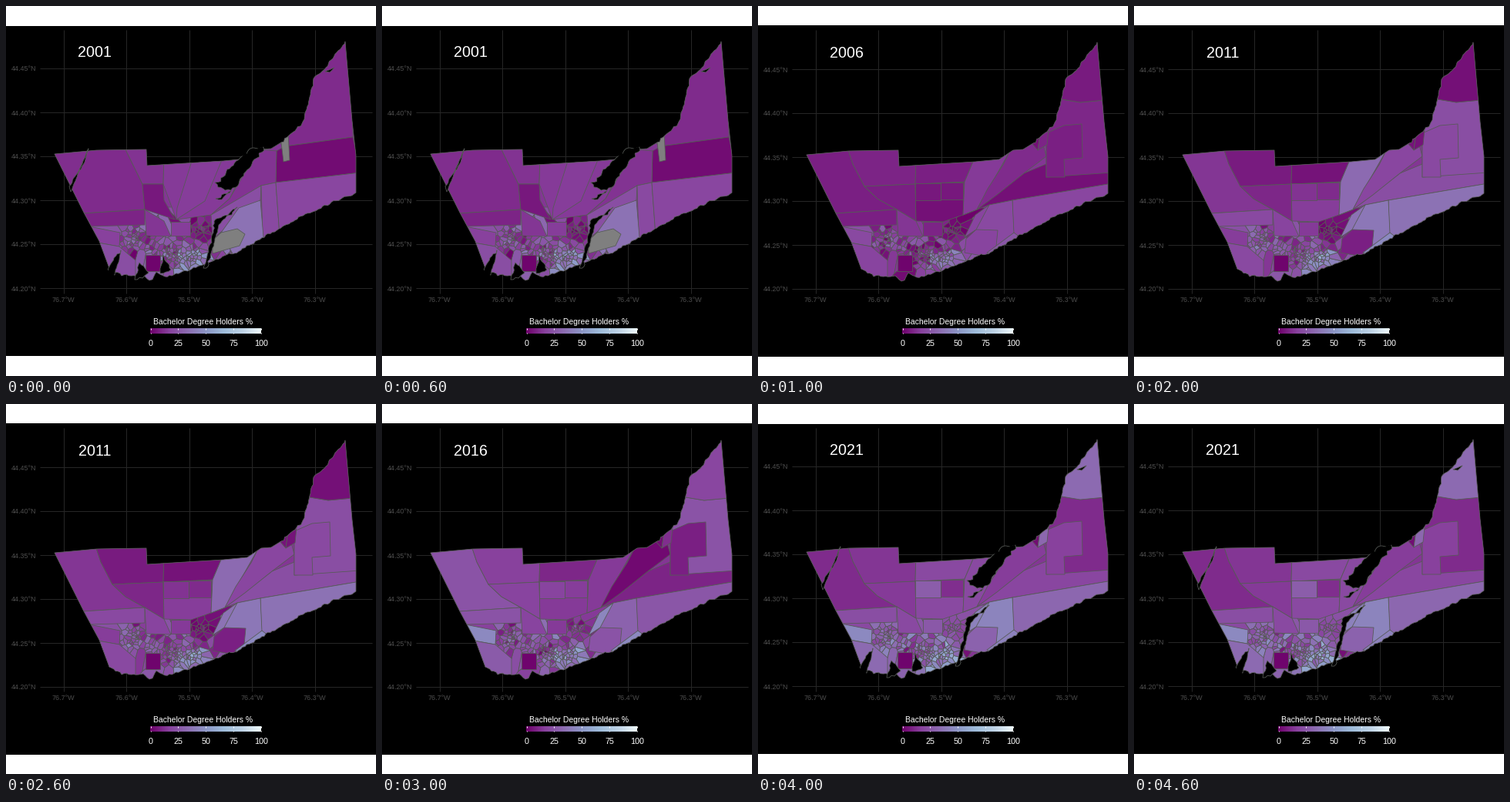
These frames come from a looping animation (480 by 480 pixels, 5000 ms). A matplotlib script:

```python
import numpy as np
import matplotlib.pyplot as plt
from matplotlib.animation import ArtistAnimation
from matplotlib.collections import LineCollection, PolyCollection
from matplotlib.colors import LinearSegmentedColormap
from matplotlib.patches import Polygon, Rectangle

plt.rcParams["font.family"] = "Liberation Sans"
EDGE, MISSING = "#565a56", "#7f7f7f"
CMAP = LinearSegmentedColormap.from_list("degree", [
    "#6e016b", "#88419d", "#8c6bb1", "#8c96c6", "#9ebcda", "#bfd3e6", "#edf8fb"])
MEAN = 20, 14, 22, 22, 27   # typical share per census
CORE = 4, 5, 3, 13, 20      # inner north-east blocks

fig = plt.figure(figsize=(480 / 72, 480 / 72), dpi=72, facecolor="white")
ax = fig.add_axes([0, 0, 1, 1])


def shade(value):
    return MISSING if value is None else CMAP(value / 100)


def rough(points, amp, seed):
    """Break straight edges into a ragged shoreline."""
    rng = np.random.default_rng(seed)
    pts = np.array(points, float)
    out = []
    for a, b in zip(pts[:-1], pts[1:]):
        step = b - a
        n = max(1, int(np.hypot(*step) / 3))
        normal = step[::-1] * (-1, 1) / np.hypot(*step)
        drift = 0
        for k in range(n):
            out.append(a + step * k / n + normal * drift)
            drift = drift / 2 + rng.normal(0, amp)
    return out + [pts[-1]]


def voronoi(sites, box):
    """Cells of a Voronoi diagram, by cutting the box with bisectors."""
    cells = []
    for i, p in enumerate(sites):
        cell = [np.array(c, float) for c in box]
        for j, q in enumerate(sites):
            if i == j:
                continue
            mid, normal = (p + q) / 2, q - p
            kept = []
            for a, b in zip(cell, cell[1:] + cell[:1]):
                da, db = (a - mid) @ normal, (b - mid) @ normal
                if da <= 0:
                    kept.append(a)
                if da * db < 0:
                    kept.append(a + (b - a) * da / (da - db))
            cell = kept
        if cell:
            cells.append((p, np.array(cell)))
    return cells


def rect(x, y, w, h):
    return (x, y), (x + w, y), (x + w, y + h), (x, y + h)


# Township outline, clockwise from the north-west corner
north = [(63, 193), (118, 188), (182, 187), (183, 208), (282, 202), (313, 199),
         (331, 187), (344, 186), (357, 178)]
lakeside = [(357, 178), (375, 163), (387, 148), (394, 119), (399, 95), (415, 81), (440, 47)]
east = [(440, 47), (449, 150), (454, 195), (454, 243)]
shore = [(454, 243), (388, 271), (337, 298), (296, 322), (255, 337), (206, 352),
         (195, 346), (186, 357), (178, 350), (150, 351), (134, 341)]
west = [(134, 341), (121, 306), (101, 269)]
land = np.array(north + rough(lakeside, .7, 3) + east + rough(shore, .9, 5) + west)

# Junctions where several areas meet
gap, n1, n2, n3, tip = (116, 184), (138, 234), (204, 231), (268, 228), (282, 195)
hub, mid, w0, w1, w2 = (180, 264), (205, 279), (100, 269), (108, 286), (119, 307)
w3, w4, fork, bay, notch = (147, 312), (148, 294), (284, 264), (266, 271), (328, 186)
e0, e1, e2, e3 = (300, 258), (330, 252), (460, 230), (460, 216)
r0, r1, t0, t1, spur = (374, 222), (374, 165), (394, 121), (450, 122), (363, 187)
cape, p0, p1, quay = (366, 165), (283, 290), (311, 291), (296, 325)
top, top2, b0, b1, b2 = (450, 40), (380, 60), (350, 229), (331, 233), (355, 298)

# Areas of the later censuses, painted back to front
ZONES = [
    ((8, 14, 24, 11), (60, 190), gap, (123, 205), n1, (155, 250), hub, w0),
    ((9, 7, 17, 14), gap, (205, 184), n2, n1, (123, 205)),
    ((8, 10, 18, 15), n1, n2, mid, hub, (155, 250)),
    ((4, 16, 15, 20), n2, n3, bay, (240, 280), mid),
    ((8, 5, 10, 20), (205, 195), tip, n3, n2),
    ((6, 13, 18, 28), *rect(204, 230, 33, 22)),
    ((6, 11, 16, 12), *rect(237, 229, 29, 22)),
    ((4, 22, 9, 19), bay, fork, (345, 217), (374, 205), e3, e2, e1, e0),
    ((15, 33, 15, 20), tip, notch, fork, bay, n3),
    ((11, 19, 2, 16), notch, cape, (374, 195), (345, 217), (310, 245), fork,
     (298, 237), (318, 206)),
    ((10, 22, 24, 11), t0, (418, 125), t1, e3, r0, r1),
    ((8, 20, 8, 17), r1, (397, 155), (420, 153), (421, 197), (397, 199), (398, 222), r0),
    ((7, 4, 19, 33), t0, (418, 125), t1, top, top2),
    ((4, 5, 3, 3), (355, 178), cape, spur),
    ((9, 5, 12, 32), cape, (377, 160), (375, 180), spur),
    ((19, 36, 25, 32), e1, e2, (460, 260), (332, 310)),
    ((20, 38, 30, 43), p0, (278, 275), e0, e1, (332, 295), quay),
    ((18, 8, 24, 30), p0, p1, (309, 312), quay, (268, 320), (270, 302)),
    ((18, 36, 44, 42), (268, 300), (282, 271), e0, p0),
    ((25, 45, 45, 42), (297, 320), (332, 294), (340, 300), (310, 325)),
]

# Areas of 2001
OLD_ZONES = [
    (12, (60, 190), (107, 186), (83, 239)),
    (11, (107, 186), (154, 184), (177, 231), hub, w0, (84, 238)),
    (13, (154, 184), (205, 184), n2, (177, 231)),
    (15, n2, (205, 195), (320, 190), (290, 250), bay, (221, 277)),
    (16, (243, 195), tip, (258, 253), (221, 277), (222, 262)),
    (6, (177, 231), n2, (205, 252), (219, 277), hub),
    (11, top, (450, 170), (362, 182), (350, 175), top2),
    (3, (362, 182), (450, 170), e3, b0, (351, 188)),
    (13, notch, (351, 188), b0, b1, e0, bay, (290, 250)),
    (22, bay, b1, e1, p0, (268, 302)),
    (20, b1, b0, b2, (333, 300)),
    (19, b0, e3, (460, 260), b2),
    (36, (302, 262), e1, (334, 300), quay, (279, 294)),
    (None, (268, 304), (279, 294), (300, 289), (310, 296), (303, 311), (268, 321)),
    (None, (357, 177), cape, (368, 200), (360, 202)),
]

# Western and central areas, the same in every census
COMMON = [
    ((9, 8, 20, 24, 22), w0, hub, (180, 284), w1),
    ((17, 20, 16, 45, 45), w1, w4, w3, w2),
    ((22, 18, 20, 27, 33), w2, w3, (168, 330), (168, 355), (130, 345)),
    ((14, 14, 18, 18, 20), hub, mid, (214, 299), (182, 298)),
    ((16, 9, 15, 15, 26), *rect(214, 280, 25, 18)),
    ((1,) * 5, *rect(181, 323, 19, 21)),
]

# Lakes and inlets that are cut out in 2001 and 2021
LAKES = [
    (1.6, (306, 195), (290, 211), (271, 229), (275, 235), (288, 238), (300, 234),
     (319, 205), (334, 183)),
    (.4, (107, 185), (84, 241), (82, 234), (100, 206)),
    (.8, (300, 261), (276, 284), (262, 338), (256, 340), (269, 294), (270, 279)),
    (.7, (132, 349), (134, 338), (149, 317), (141, 349)),
    (.7, (167, 355), (173, 333), (185, 346), (177, 353)),
    (.7, (200, 347), (204, 323), (214, 342)),
    (.8, (272, 250), (292, 240), (280, 251)),
    (.4, (414, 85), (426, 80), (420, 86)),
]
water = [rough([*p, p[0]], amp, k) for k, (amp, *p) in enumerate(LAKES)]

# Small city blocks crowd around a few centres
rng = np.random.default_rng(11)
sites = np.vstack([rng.normal((x, y), 10, (n, 2)) for x, y, n in [
    (163, 304, 45), (192, 312, 22), (217, 324, 50), (240, 326, 34),
    (252, 290, 34), (280, 322, 6)]])
blocks = voronoi(sites, rect(105, 262, 200, 100))


def block_value(k, site, rng):
    x, y = site
    if x > 238 and y < 304:
        return max(0, rng.normal(CORE[k], 4))
    waterfront = 222 < x < 262 and y > 318
    return np.clip(rng.normal(MEAN[k] + 18 * waterfront, 9), 0, 75)


def polys(shapes, colors, z, clip=None, edge=EDGE):
    art = PolyCollection(shapes, facecolors=colors, edgecolors=edge,
                         linewidths=.8, zorder=z)
    ax.add_collection(art, autolim=False)
    if clip is not None:
        art.set_clip_path(clip)
    return art


def label(x, y, text, size, color="white", ha="center"):
    return ax.text(x, y, text, size=size, color=color, ha=ha, va="baseline", zorder=9)


def build(k):
    """All artists that belong to one census."""
    cut = k in (0, 4)
    dy = 0 if cut else 1
    arts = [ax.add_patch(Rectangle((0, 26 - dy), 480, 428 + 2 * dy, fc="black", lw=0))]
    lats = [80.5 + dy + 57 * i for i in range(6)]
    grid = [[(44, y), (474.5, y)] for y in lats]
    grid += [[(x, 31), (x, 372.5)] for x in 74.5 + 81.5 * np.arange(5)]
    arts.append(ax.add_collection(LineCollection(
        grid, colors="#262626", linewidths=1), autolim=False))
    for i, y in enumerate(lats):
        arts.append(label(39, y + 4, f"{44.45 - .05 * i:.2f}°N", 9, "#4d4d4d", "right"))

    move = np.array([0, dy - 1])
    outline = land + move
    clip = ax.add_patch(Polygon(outline, fc=shade(14), ec="none", zorder=2))
    rng = np.random.default_rng(40 + k)
    colors = [shade(block_value(k, site, rng)) for site, _ in blocks]
    arts += [clip, polys([cell + move for _, cell in blocks], colors, 3, clip)]

    areas = [(v[k], p) for v, *p in COMMON]
    if k:
        areas = [(v[k - 1], p) for v, *p in ZONES] + areas
    else:
        areas = [(v, p) for v, *p in OLD_ZONES] + areas
    arts.append(polys([np.array(p) + move * (k > 0) for _, p in areas],
                      [shade(v) for v, _ in areas], 4, clip))
    arts.append(polys([outline], "none", 5))
    if cut:
        arts.append(polys(water, "black", 6))
        # open the inlets to the surroundings
        mouths = [[(307, 194), (334, 182), (326, 194), (305, 202)],
                  rect(131, 343, 9, 9)]
        arts.append(polys(mouths, "black", 7, edge="none"))
    arts.append(label(115, 66 + dy, str(2001 + 5 * k), 19.6))
    return arts


frames = [build(k) for k in range(5)]

# Fixed axis text and legend
for i in range(5):
    label(74.5 + 81.5 * i, 384, f"{76.7 - .1 * i:.1f}°W", 9, "#4d4d4d")
    x = 187.5 + 35.9 * i
    ax.vlines([x, x], [418, 423.5], [419.5, 425], colors="white", lw=1, zorder=9)
    label(x, 441, str(25 * i), 10.7)
label(255.5, 413, "Bachelor Degree Holders %", 10.4)
ax.imshow(np.linspace(0, 1, 300)[None], cmap=CMAP, extent=(187, 331, 425, 418),
          aspect="auto", zorder=8)
ax.set(xlim=(0, 480), ylim=(480, 0))
ax.axis("off")

anim = ArtistAnimation(fig, frames, interval=1000, repeat=True, repeat_delay=0)
plt.show()
```
